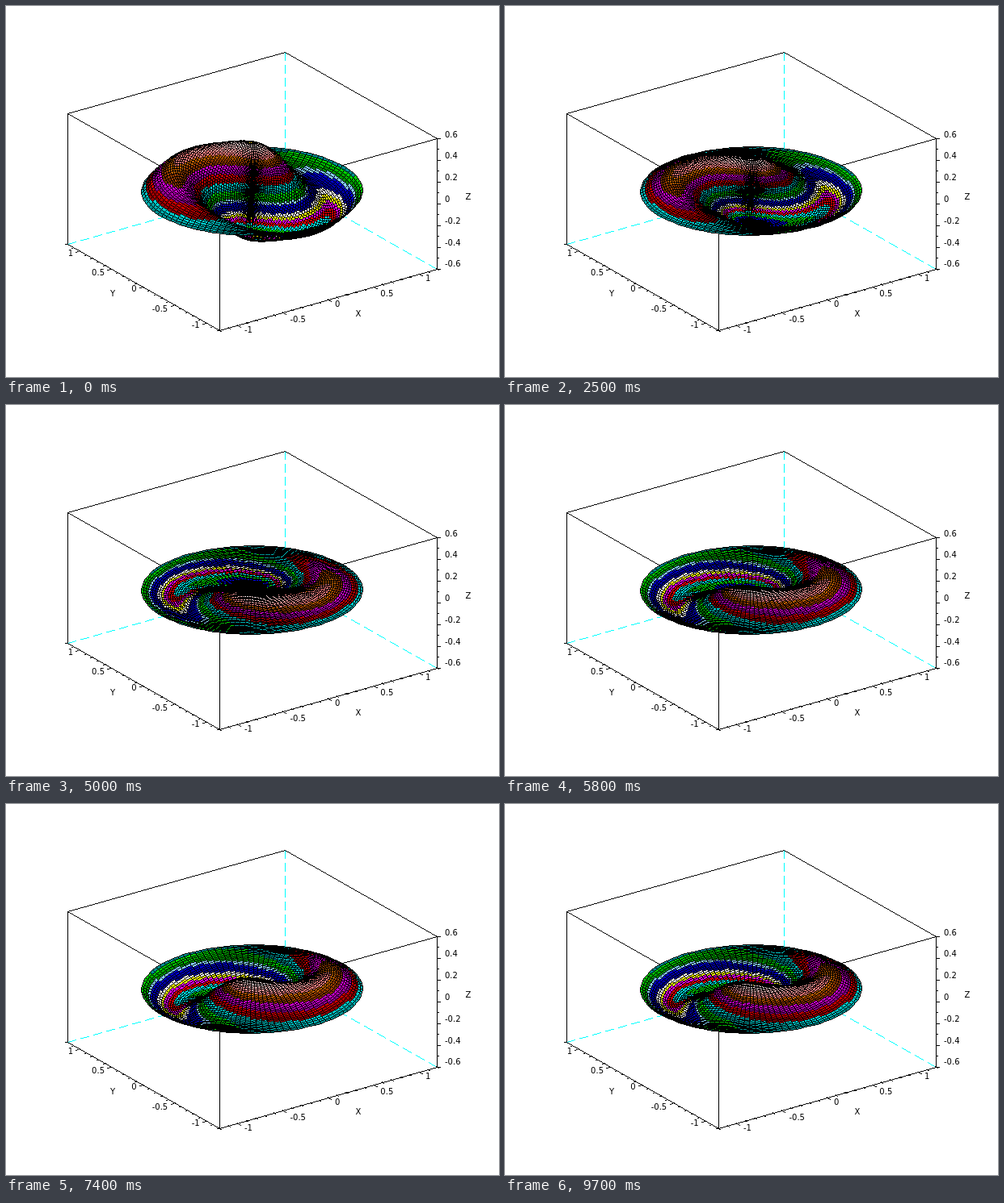
An HTML page with a canvas that plays this animation: 610x460 px, repeating every 9800 ms.

```html
<!DOCTYPE html>
<html>
<head>
<meta charset="utf-8">
<style>
html, body { margin: 0; width: 610px; height: 460px; overflow: hidden; background: #fff; }
canvas { display: block; }
</style>
</head>
<body>
<canvas id="stage" width="610" height="460"></canvas>
<script>
const W = 610, H = 460, LOOP = 9800, STEP = 100;
const RINGS = 50, SPOKES = 100, PEAK = 0.31;
const ctx = document.getElementById('stage').getContext('2d');

// 32-entry plotting palette, lowest value first
const palette = ('000 00f 0f0 0ff f00 f0f ff0 fff 000090 0000b0 0000d0 87ceff 009000 00b000 00d000 ' +
  '009090 00b0b0 00d0d0 900000 b00000 d00000 900090 b000b0 d000d0 803000 a04000 c06000 ' +
  'ff8080 ffa0a0 ffc0c0 ffe0e0 ffd700').split(' ').map(color);

// Hex colour to a little-endian RGBA pixel
function color(hex) {
  if (hex.length === 3) hex = hex.replace(/./g, '$&$&');
  const n = parseInt(hex, 16);
  return (0xff000000 | (n & 255) << 16 | n & 0xff00 | n >> 16) >>> 0;
}

const BLACK = color('000'), CYAN = color('0ff');

function project(x, y, z) {
  return [304.5 + 112.08 * x - 78.33 * y, 229.5 - 31.67 * x - 44.58 * y - 135 * z];
}

// Pixel drawing without antialiasing
let pixels;

function line(a, b, c = BLACK, dashed = false) {
  const x = Math.floor(a[0]), y = Math.floor(a[1]);
  const dx = Math.floor(b[0]) - x, dy = Math.floor(b[1]) - y;
  const n = Math.max(Math.abs(dx), Math.abs(dy)) || 1;
  for (let i = 0; i <= n; i++) {
    if (dashed && i % 16 > 10) continue;
    pixels[Math.round(y + dy * i / n) * W + Math.round(x + dx * i / n)] = c;
  }
}

function fill(points, c) {
  const ys = points.map(p => p[1]), bottom = Math.max(...ys);
  for (let y = Math.ceil(Math.min(...ys) - 0.5); y + 0.5 <= bottom; y++) {
    const cuts = [];
    points.forEach((p, i) => {
      const q = points[(i + 1) % points.length];
      if ((p[1] <= y + 0.5) !== (q[1] <= y + 0.5))
        cuts.push(p[0] + (y + 0.5 - p[1]) / (q[1] - p[1]) * (q[0] - p[0]));
    });
    cuts.sort((a, b) => a - b);
    for (let i = 0; i + 1 < cuts.length; i += 2)
      for (let x = Math.ceil(cuts[i] - 0.5); x + 0.5 < cuts[i + 1]; x++) pixels[y * W + x] = c;
  }
}

function drawLabels() {
  ctx.fillStyle = '#fff';
  ctx.fillRect(0, 0, W, H);
  ctx.fillStyle = '#000';
  ctx.font = '10px "DejaVu Sans", sans-serif';
  ctx.textBaseline = 'middle';
  ctx.textAlign = 'center';
  // Wider labels stand further from their tick
  const tickLabel = (text, [x, y], side, slope) => {
    const gap = 8.2 + 0.54 * ctx.measureText(text).width;
    ctx.fillText(text, x + side * gap, y + slope * gap);
  };
  for (const v of [-1, -0.5, 0, 0.5, 1]) {
    tickLabel(String(v), project(v, -1.2, -0.6), 1, 0.53);
    tickLabel(String(v), project(-1.2, v, -0.6), -1, 0.28);
  }
  ctx.fillText('X', 436, 382);
  ctx.fillText('Y', 132, 357);
  ctx.fillText('Z', 572, 237);
  ctx.textAlign = 'left';
  for (let i = -3; i <= 3; i++) ctx.fillText(String(i / 5), 543, 240.5 - 26.8 * i);
}

function drawBox() {
  const left = [76, 295], front = [264, 402], right = [533, 326], back = [345, 219];
  const up = p => [p[0], p[1] - 162];
  for (const p of [left, right, up(back)]) line(p, back, CYAN, true);
  for (const p of [left, front, right]) line(p, up(p));
  line(left, front);
  line(front, right);
  const top = [left, front, right, back].map(up);
  top.forEach((p, i) => line(p, top[(i + 1) % 4]));

  const tick = (p, dx, dy) => line(p, [p[0] + dx, p[1] + dy]);
  for (let i = -12; i <= 12; i++) {
    const s = i % 5 ? 0.5 : 1;
    tick(project(i / 10, -1.2, -0.6), 4.5 * s, 2.6 * s);
    tick(project(-1.2, i / 10, -0.6), -5 * s, 1.4 * s);
  }
  for (let i = -6; i <= 6; i++) tick([533, 245 - 13.5 * i], i % 2 ? 2 : 4, 0);
}

function besselJ1(x) {
  let term = x / 2, sum = term;
  for (let k = 1; k < 16; k++) sum += term *= -x * x / 4 / (k * (k + 1));
  return sum;
}

// Two membrane modes a quarter turn apart add up to a spiral
const TURN = 97 * Math.PI / 180;
const nodes = [];
for (let i = 0; i <= RINGS; i++) {
  const r = i / RINGS;
  const first = besselJ1(3.8317 * r), second = 0.8 * besselJ1(7.0156 * r);
  nodes.push(Array.from({ length: SPOKES }, (_, j) => {
    const a = 2 * Math.PI * j / SPOKES;
    const v = (first * Math.cos(a - TURN) - second * Math.sin(a - TURN)) / 0.667;
    return { x: r * Math.cos(a), y: r * Math.sin(a), v };
  }));
}

const faces = [];
for (let i = 0; i < RINGS; i++)
  for (let j = 0; j < SPOKES; j++) {
    const k = (j + 1) % SPOKES;
    const corners = [nodes[i][j], nodes[i + 1][j], nodes[i + 1][k], nodes[i][k]];
    const mean = key => corners.reduce((s, p) => s + p[key], 0) / 4;
    faces.push({ corners, x: mean('x'), y: mean('y'), v: mean('v') });
  }

function drawSurface(amp) {
  for (const row of nodes)
    for (const p of row) p.at = project(p.x, p.y, amp * PEAK * p.v);
  for (const f of faces)
    f.near = -0.9165 * (0.579 * f.x + 0.815 * f.y) + 0.431 * amp * PEAK * f.v;
  faces.sort((a, b) => a.near - b.near);
  for (const f of faces) {
    const level = Math.floor(31 * (1 + Math.sign(amp) * f.v) / 2);
    const points = f.corners.map(p => p.at);
    fill(points, palette[Math.max(0, Math.min(31, level))]);
    points.forEach((p, i) => line(p, points[(i + 1) % 4]));
  }
}

drawLabels();
const image = ctx.getImageData(0, 0, W, H);
pixels = new Uint32Array(image.data.buffer);
drawBox();
const backdrop = pixels.slice();

const start = performance.now();
let shown = -1;
function render() {
  const step = Math.floor((performance.now() - start) % LOOP / STEP);
  if (step !== shown) {
    shown = step;
    const t = step * STEP / 1000;
    pixels.set(backdrop);
    drawSurface(Math.exp(-0.04 * t) * Math.cos(2 * Math.PI * t / 16.5));
    ctx.putImageData(image, 0, 0);
  }
  requestAnimationFrame(render);
}
render();
</script>
</body>
</html>
```
